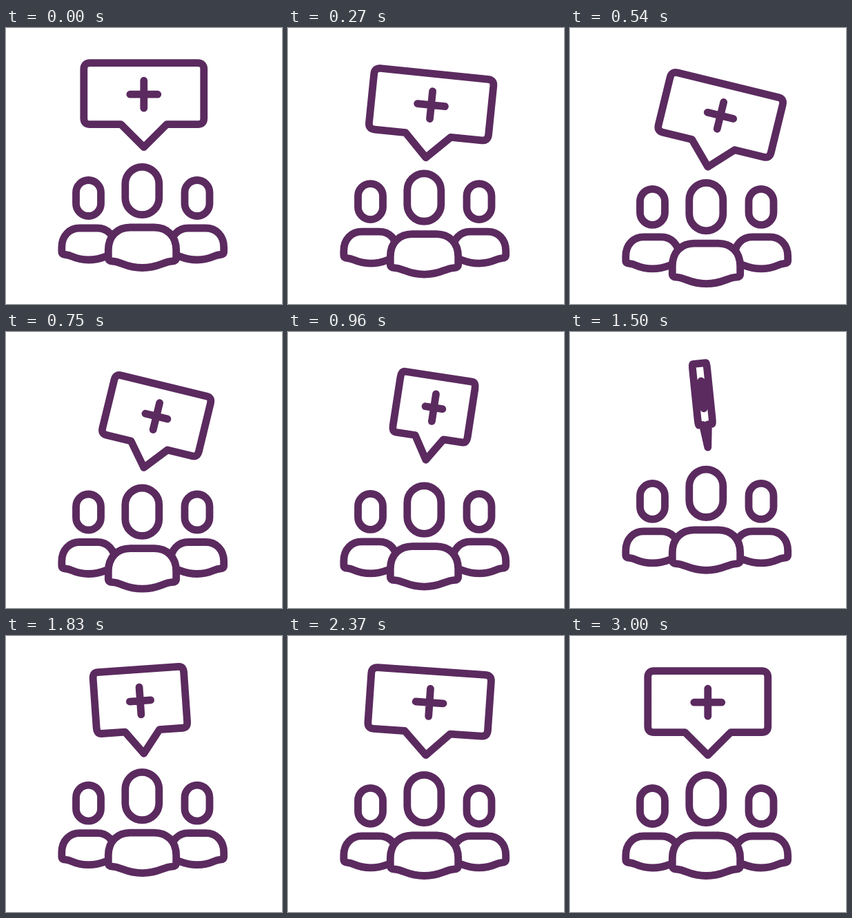
An HTML page for the animation above (5090 ms loop, 400 px wide and 400 px high).

```html
<!DOCTYPE html>
<html lang="en">
<head>
<meta charset="utf-8">
<title>Group message</title>
<style>
  html, body { margin: 0; width: 100%; height: 100%; overflow: hidden; background: #fff; }
  svg { display: block; width: 100vw; height: 100vh; }
  .ink { fill: #fff; stroke: #5b2a5f; stroke-width: 10.8; stroke-linecap: round; stroke-linejoin: round; }
</style>
</head>
<body>
<svg viewBox="0 0 400 400" class="ink">
  <g id="sides">
    <g id="side">
      <rect x="101.5" y="220.5" width="36" height="52" rx="18"/>
      <path d="M80.8 318C80.8 301 92 290 107 290H132C147 290 158 301 158 318V328C146 328 141 336 119.5 336C98 336 97 329 86 328.5Q80.8 328.5 80.8 324Z"/>
    </g>
    <use href="#side" transform="translate(396.5 0) scale(-1 1)"/>
  </g>
  <g id="leader">
    <rect x="172.8" y="201.3" width="49" height="69.4" rx="24.5"/>
    <path d="M148.3 322C148.3 301 162 289 180 289H215C233 289 246.7 301 246.7 322V333Q246.7 338 241 338C226 339 222 347.5 197.5 347.5C173 347.5 169 339 154 338Q148.3 338 148.3 333Z"/>
  </g>
  <path id="bubble"/>
</svg>
<script>
const LOOP = 5090, STEP = 30, MOVE_END = 3000;

// Linear and smoothed progress from 0 to 1 between two times.
const progress = (t, from, to) => Math.min(1, Math.max(0, (t - from) / (to - from)));
const ramp = (t, from, to) => {
  const x = progress(t, from, to);
  return x * x * (3 - 2 * x);
};

// Drop by `depth`, spring above rest by `rebound`, then settle.
const bob = (t, depth, rebound, lag) =>
  depth * ramp(t, 0, 520 + lag / 2)
  - (depth + rebound) * ramp(t, 550 + lag, 1410 + lag)
  + rebound * ramp(t, 1460 + lag, 2130 + lag);

// Swing right, left, slightly right again, upright.
const turn = t =>
  14.4 * ramp(t, 0, 620) - 20.4 * ramp(t, 650, 1545)
  + 10 * ramp(t, 1600, 2400) - 4 * ramp(t, 2430, MOVE_END);

// Speed up until edge-on, then open again and slow down.
const EDGE_ON = 1455;
const width = t => t < EDGE_ON
  ? 1 - progress(t, 430, EDGE_ON) ** 1.5
  : 1 - (1 - progress(t, EDGE_ON, 2245)) ** 2.2;

// Outline around the tail tip; only the geometry narrows, not the stroke.
function bubblePath(s) {
  const x = v => (v * s).toFixed(2);
  const w = 87, r = 9, top = -122, low = -33;
  return `M0 0L${x(low)} ${low}H${x(r - w)}Q${x(-w)} ${low} ${x(-w)} ${low - r}` +
    `V${top + r}Q${x(-w)} ${top} ${x(r - w)} ${top}H${x(w - r)}Q${x(w)} ${top} ${x(w)} ${top + r}` +
    `V${low - r}Q${x(w)} ${low} ${x(w - r)} ${low}H${x(-low)}Z` +
    `M${x(-20)} -76.5H${x(20)}M0 -96.5V-56.5`;
}

const [sides, leader, bubble] = ['sides', 'leader', 'bubble'].map(id => document.getElementById(id));
const place = (part, x, y, angle = 0) =>
  part.setAttribute('transform', `translate(${x} ${y}) rotate(${angle})`);

function draw(now) {
  const t = Math.min(MOVE_END, Math.floor((now % LOOP) / STEP) * STEP);
  place(sides, 0, bob(t, 14.5, 4.4, 320));
  place(leader, 0, bob(t, 24.7, 4.4, 235));
  place(bubble, 199.8, 172.7 + bob(t, 28.5, 5.7, 0), turn(t));
  bubble.setAttribute('d', bubblePath(width(t)));
}

const start = performance.now();
function tick() {
  draw(performance.now() - start);
  requestAnimationFrame(tick);
}
tick();
</script>
</body>
</html>
```
